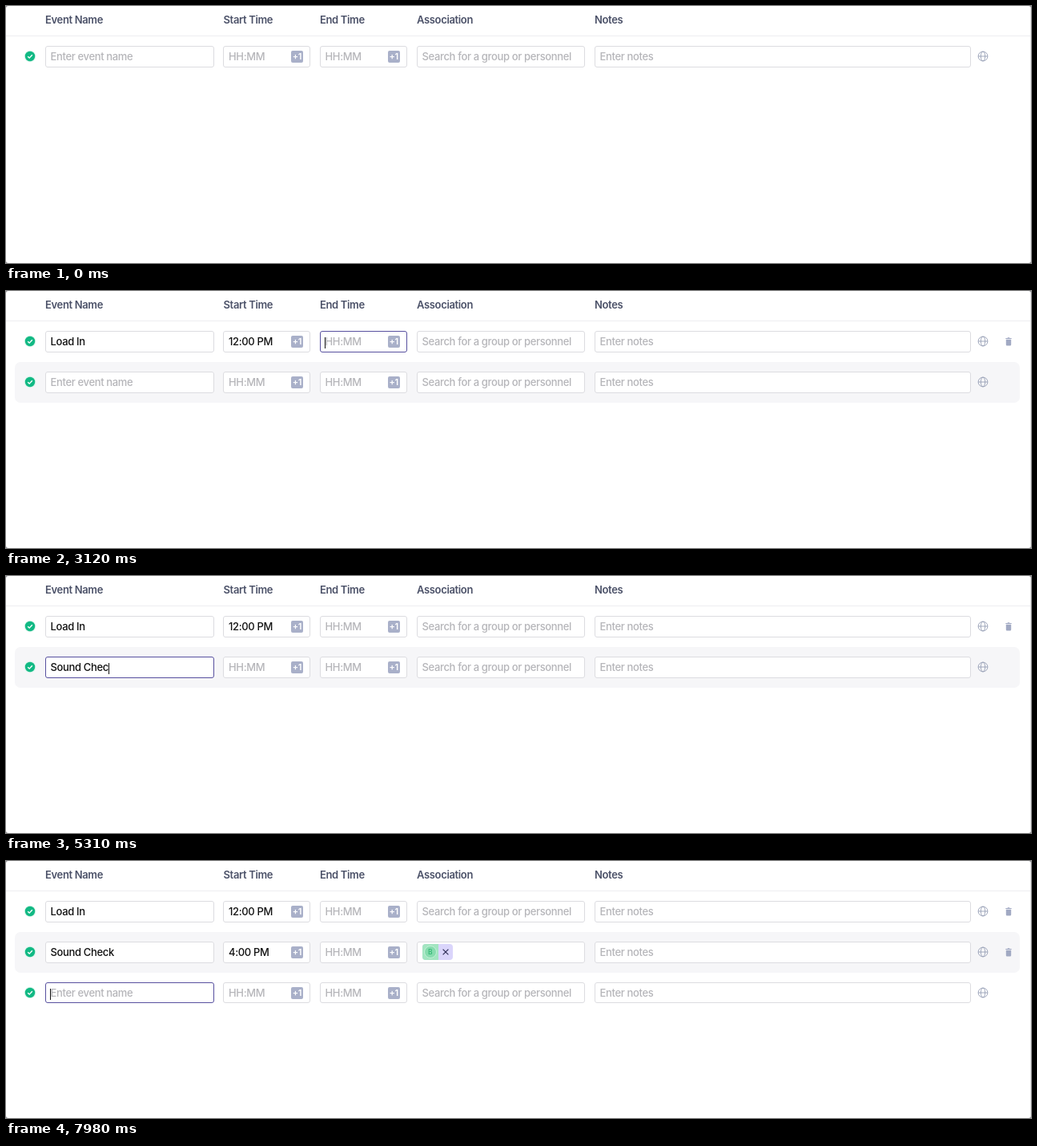
These frames come from a looping animation (1280 px wide and 322 px high, 8000 ms). An HTML page:

```html
<!DOCTYPE html>
<html lang="en">
<head>
<meta charset="utf-8">
<title>Event schedule</title>
<style>
html, body { margin: 0; width: 100%; height: 100%; overflow: hidden; background: #8a8a8e; }
#stage {
  position: absolute; left: 0; top: 0; width: 1280px; height: 322px; overflow: hidden;
  box-sizing: border-box; border-right: 1px solid #e6e6e8; border-radius: 3px; background: #fff;
  font: 500 13px/26px Inter, "Liberation Sans", sans-serif; letter-spacing: -.35px; color: #111;
}
#stage * { box-sizing: border-box; }
#stage div, #stage svg { position: absolute; white-space: pre; }
.head { top: 4px; font-weight: 600; color: #4b5168; }
.rule { left: 0; top: 37px; width: 1279px; height: 1px; background: #ededf0; }
.row { left: 0; width: 1279px; height: 51px; }
.row.tinted::before {
  content: ""; position: absolute; left: 11px; top: 0; width: 1255px; height: 51px;
  border-radius: 7px; background: #f6f6f8;
}
.field {
  top: 12.3px; height: 26.4px; padding-left: 6px; line-height: 24.4px;
  border: 1px solid #dcdce0; border-radius: 3px; background: #fff;
}
.field.focus { border-color: #57509f; }
.hint { color: #b5b5b9; }
.caret { position: relative; display: none; }
.caret::after {
  content: ""; position: absolute; left: -.2px; top: 1px; width: 1px; height: 14px; background: #111;
}
.focus .caret { display: inline-block; width: 0; height: 16px; vertical-align: middle; }
.plus {
  right: 8.2px; top: 5px; width: 15px; height: 15px; border-radius: 2px; background: #a9b0c9;
  color: #fff; font-size: 11px; font-weight: 600; line-height: 15px; text-align: center;
}
.avatar { width: 20px; height: 20px; border-radius: 4px; }
.avatar span {
  position: absolute; left: 2px; top: 2px; width: 16px; height: 16px; border-radius: 50%;
  font-size: 8.5px; line-height: 14px; text-align: center; border: 1px solid;
}
.green { background: #a3e5c1; color: #2fb574; }
.green span { background: #86dcae; border-color: #c2f0d6; }
.slate { background: #a4acc1; color: #4b5168; }
.slate span { background: #b0b7ca; border-color: #d3d8e4; }
#menu {
  left: 513px; top: 133px; width: 210px; border-radius: 4px; background: #fff;
  overflow: hidden; z-index: 2; font-weight: 600; color: #1f2026;
}
#menuBox { left: 0; top: 0; filter: drop-shadow(0 3px 4px rgba(30, 30, 60, .13)); z-index: 2; }
.item { left: 0; width: 210px; height: 31.8px; line-height: 32px; padding-left: 32px; }
.item .avatar { left: 6px; top: 6px; }
.chip { left: 6px; top: 2px; width: 38px; height: 20px; border-radius: 4px; background: #dad5fb; }
.chip .avatar { left: 0; top: 0; border-radius: 4px 0 0 4px; }
.chip svg { left: 25px; top: 6px; }
</style>
</head>
<body>
<div id="stage"></div>
<script>
const LOOP = 8000;
const PITCH = 50.8;
const columns = [
  { title: "Event Name", hint: "Enter event name", x: 48.5, w: 211 },
  { title: "Start Time", hint: "HH:MM", x: 271, w: 109, plus: true },
  { title: "End Time", hint: "HH:MM", x: 391.5, w: 109.3, plus: true },
  { title: "Association", hint: "Search for a group or personnel", x: 512.5, w: 210.5 },
  { title: "Notes", hint: "Enter notes", x: 734.5, w: 470.5 }
];
const [NAME, START, END, GROUP, NOTES] = [0, 1, 2, 3, 4];

// Focus changes: time, row, column
const focusSteps = [
  [1200, 0, NAME], [2280, 0, START], [3120, 0, END], [3480, 0, GROUP], [3840, 0, NOTES],
  [4200, 1, NAME], [5490, 1, START], [6180, 1, END], [6510, 1, GROUP], [7530, 1, NOTES],
  [7980, 2, NAME]
];
// Keystrokes: row, column, text, time of each key
const typing = [
  [0, NAME, "Load In", [1560, 1740, 1800, 1860, 1950, 2010, 2160]],
  [0, START, "12pm", [2700, 2790, 2910, 3060]],
  [1, NAME, "Sound Check", [4470, 4560, 4710, 4800, 4860, 4950, 5100, 5190, 5250, 5310, 5400]],
  [1, START, "4pm", [5850, 5910, 6060]],
  [1, GROUP, "Ban", [6840, 6990, 7110]]
];
// Times rewritten when their field loses focus
const formatted = [[3120, 0, START, "12:00 PM"], [6180, 1, START, "4:00 PM"]];
const rowShown = [0, 2730, 5880];
const binShown = [2730, 5880, Infinity];
const MENU_OPEN = 6870, MENU_FILTER = 7020, MENU_CLOSE = 7530;

const stage = document.getElementById("stage");

function add(parent, cls, html = "", css = {}) {
  const el = document.createElement("div");
  el.className = cls;
  el.innerHTML = html;
  Object.assign(el.style, css);
  parent.append(el);
  return el;
}
const px = n => n + "px";
const show = (el, on) => { el.style.display = on ? "" : "none"; };
const icon = (w, h, body) =>
  `<svg width="${w}" height="${h}" viewBox="0 0 ${w} ${h}" fill="none">${body}</svg>`;
const avatar = (tone, text) => `<div class="avatar ${tone}"><span>${text}</span></div>`;

const check = icon(16, 16, `<circle cx="8" cy="8" r="7.2" fill="#d3f3e6"/>
  <circle cx="8" cy="8" r="6.2" fill="#12b984"/>
  <path d="M5.2 8.2 7.2 10.1 10.8 6.2" stroke="#fff" stroke-width="1.4"/>`);
const globe = icon(14, 14, `<g stroke="#9ea6bb"><circle cx="7" cy="7" r="5.9"/>
  <ellipse cx="7" cy="7" rx="2.7" ry="5.9"/><path d="M1.1 7H12.9"/></g>`);
const bin = icon(8, 11, `<path d="M.3.9H2.5L3 .3H5L5.5.9H7.7V2.1H.3ZM.8 2.8H7.2V9.3Q7.2 10.5 6 10.5H2
  Q.8 10.5.8 9.3Z" fill="#a1a9c3"/>`);
const cross = icon(8, 8, `<path d="M.6.6 7.4 7.4M7.4.6.6 7.4" stroke="#35345c" stroke-width="1.3"/>`);

add(stage, "rule");
columns.forEach(c => add(stage, "head", c.title, { left: px(c.x + .5) }));

const rows = rowShown.map((_, i) => {
  const el = add(stage, i === 1 ? "row tinted" : "row", "", { top: px(38.2 + i * PITCH) });
  add(el, "", check, { left: "22.3px", top: "17.3px", width: "16px", height: "16px" });
  add(el, "", globe, { left: "1213.4px", top: "18.3px", width: "14px", height: "14px" });
  const trash = add(el, "", bin, { left: "1248.1px", top: "19.9px", width: "8px", height: "11px" });
  const fields = columns.map(c => {
    const box = add(el, "field", "<span></span><i class='caret'></i><span class='hint'></span>",
      { left: px(c.x), width: px(c.w) });
    if (c.plus) add(box, "plus", "+1");
    const [value, , hint] = box.children;
    return { box, value, hint };
  });
  return { el, trash, fields };
});

const chip = add(rows[1].fields[GROUP].box, "chip", avatar("green", "B") + cross);

const menuBox = add(stage, "", "", {});
menuBox.id = "menuBox";
const menu = add(menuBox, "", "");
menu.id = "menu";
add(menu, "item", avatar("green", "B") + "Banjo Crew", { top: "0", background: "#f5f5f8" });
add(menu, "item", avatar("slate", "BM") + "Bix Mortle", { top: "31.8px" });

function valueAt(t, r, c) {
  if (r === 1 && c === GROUP && t >= MENU_CLOSE) return "";
  const done = formatted.find(f => f[1] === r && f[2] === c && t >= f[0]);
  if (done) return done[3];
  const typed = typing.find(k => k[0] === r && k[1] === c);
  return typed ? typed[2].slice(0, typed[3].filter(at => at <= t).length) : "";
}

function render(t) {
  const focus = focusSteps.filter(f => f[0] <= t).pop();
  const chosen = t >= MENU_CLOSE;
  rows.forEach((row, r) => {
    show(row.el, t >= rowShown[r]);
    show(row.trash, t >= binShown[r]);
    row.fields.forEach((f, c) => {
      const text = valueAt(t, r, c);
      const hasChip = chosen && r === 1 && c === GROUP;
      f.value.textContent = text;
      f.hint.textContent = text || hasChip ? "" : columns[c].hint;
      f.box.classList.toggle("focus", !!focus && focus[1] === r && focus[2] === c);
    });
  });
  show(chip, chosen);
  show(menuBox, t >= MENU_OPEN && !chosen);
  menu.style.height = px(t >= MENU_FILTER ? 31.8 : 63.6);
}

const begin = performance.now();
function tick() {
  render((performance.now() - begin) % LOOP);
  requestAnimationFrame(tick);
}
tick();
</script>
</body>
</html>
```
